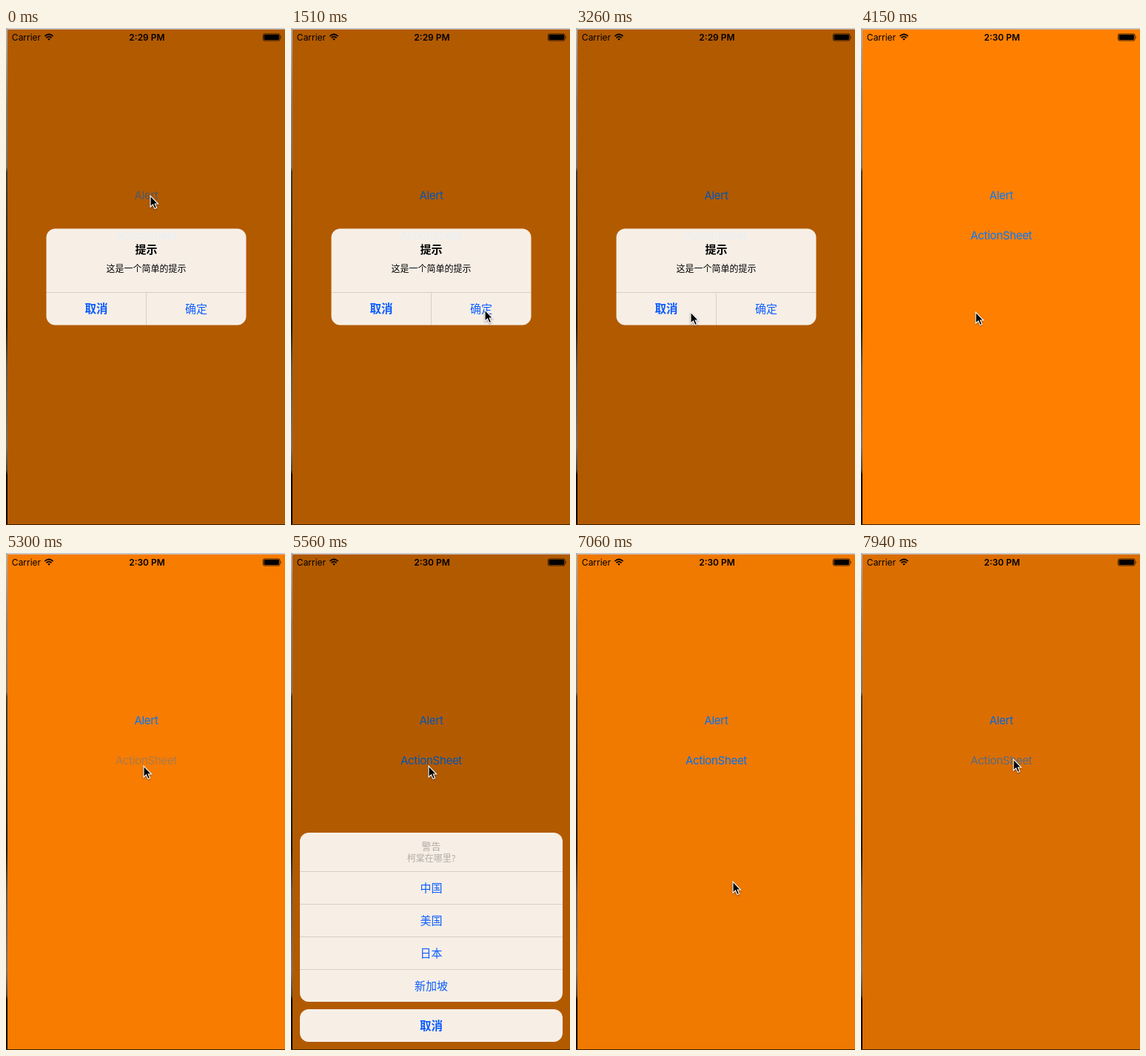
An HTML page that plays this animation: 377x670 px, repeating every 8000 ms.

```html
<!DOCTYPE html>
<html lang="zh-CN">
<head>
<meta charset="utf-8">
<style>
html, body { margin: 0; width: 100%; height: 100%; overflow: hidden; background: #111; }
svg { display: block; }
text { text-anchor: middle; font: 15px Inter, "Noto Sans CJK SC", "Noto Sans CJK", sans-serif; }
.link { fill: #007aff; letter-spacing: -.3px; }
.status text { font-size: 12px; font-weight: 500; }
.card { fill: #fff; fill-opacity: .9; }
.press { fill: #000; fill-opacity: .07; }
.line { stroke: #000; stroke-opacity: .13; }
.card-text text { font-family: "Noto Sans CJK SC", "Noto Sans CJK", sans-serif; }
.blue text { fill: #0a5cff; }
.gray text { fill: #b3aca5; }
.card-text .strong { font-weight: 700; }
.card-text .small { font-size: 12px; }
</style>
</head>
<body>
<svg width="377" height="670" viewBox="0 0 377 670">
  <defs>
    <linearGradient id="edge" x2="0" y2="1">
      <stop offset="0" stop-color="#b4b0ac"/>
      <stop offset=".15" stop-color="#85817d"/>
      <stop offset=".28" stop-color="#77736f"/>
      <stop offset=".29" stop-color="#3c3a38"/>
      <stop offset=".6" stop-color="#181818"/>
      <stop offset=".68" stop-color="#555"/>
      <stop offset=".84" stop-color="#77736f"/>
      <stop offset=".89" stop-color="#444"/>
      <stop offset=".9" stop-color="#000"/>
    </linearGradient>
    <clipPath id="screen"><path d="M2 2H377V669H2Z"/></clipPath>
    <clipPath id="alertShape"><rect x="54.5" y="270.5" width="270" height="130" rx="12"/></clipPath>
  </defs>
  <rect width="377" height="670" fill="#c9c6c3"/>
  <rect width="2" height="670" fill="url(#edge)"/>
  <rect y="669" width="377" height="1" fill="#3a2408"/>
  <g clip-path="url(#screen)">
    <rect width="377" height="670" fill="#ff8000"/>
    <text id="alertLink" class="link" x="189.5" y="230.5">Alert</text>
    <text id="sheetLink" class="link" x="189.5" y="284.5">ActionSheet</text>
    <rect id="dim" width="377" height="670"/>

    <g class="status">
      <text x="27.5" y="17" style="font-weight:400">Carrier</text>
      <text id="clock" x="190.5" y="17" style="font-weight:600"></text>
      <g fill="none" stroke="#000" stroke-width="1.7">
        <path d="M52.4 11.2Q58 5.8 63.6 11.2M54.5 13.3Q58 10 61.5 13.3"/>
        <path d="M56.3 14.9Q58 13.3 59.7 14.9L58 16.7Z" fill="#000" stroke="none"/>
      </g>
      <rect x="347.5" y="8" width="22.5" height="9" rx="1.8" fill="none" stroke="#000" stroke-width=".8"/>
      <rect x="348.6" y="9.1" width="20.3" height="6.8" rx=".8"/>
      <path d="M371 10.7q1.4 1.8 0 3.6z"/>
    </g>

    <g id="alert" class="card-text" clip-path="url(#alertShape)">
      <path class="card" d="M54 270H325V401H54Z"/>
      <path id="cancelPress" class="press" d="M54 356H189V401H54Z"/>
      <path id="okPress" class="press" d="M190 356H325V401H190Z"/>
      <path class="line" d="M54 356.5H325M189.5 357V401"/>
      <text class="strong" x="189.5" y="304">提示</text>
      <text class="small" x="189.5" y="329">这是一个简单的提示</text>
      <g class="blue">
        <text class="strong" x="122" y="384" style="font-size:15.5px">取消</text>
        <text x="257" y="384">确定</text>
      </g>
    </g>

    <g id="sheet" class="card-text">
      <rect class="card" x="12" y="377" width="355" height="228" rx="12"/>
      <rect class="card" x="12" y="615" width="355" height="44" rx="12"/>
      <path id="rowPress" class="press" d="M12 430H367V473H12Z"/>
      <path class="line" d="M12 429.5H367M12 473.5H367M12 517.5H367M12 561.5H367"/>
      <g class="gray">
        <text class="strong" x="189.5" y="399.5" style="font-size:13px;font-weight:500">警告</text>
        <text class="small" x="189.5" y="416">柯棠在哪里?</text>
      </g>
      <g class="blue">
        <text x="189.5" y="457">中国</text>
        <text x="189.5" y="501">美国</text>
        <text x="189.5" y="545">日本</text>
        <text x="189.5" y="589">新加坡</text>
        <text class="strong" x="189.5" y="642.5" style="font-size:15.5px">取消</text>
      </g>
    </g>
  </g>
  <path id="cursor" d="M0 0V15.2L3.5 12L6 17.6L8.6 16.5L6.2 11H10.6Z" stroke="#fff" stroke-width="1.1"
        style="filter:drop-shadow(0 1px 1px #0006)"/>
</svg>
<script>
const LOOP = 8000, STEP = 88.24;   // the screen refreshes in even steps
const el = id => document.getElementById(id);
const opacity = (id, v) => el(id).setAttribute('opacity', v);
const move = (id, x, y) => el(id).setAttribute('transform', `translate(${x} ${y})`);
const within = (n, a, b) => n >= a && n < b ? 1 : 0;

// Linear interpolation over a flat list: step, value, step, value, ...
function track(n, ...keys) {
  if (n <= keys[0]) return keys[1];
  for (let i = 2; i < keys.length; i += 2) {
    if (n <= keys[i]) {
      const k = (n - keys[i - 2]) / (keys[i] - keys[i - 2]);
      return keys[i - 1] + (keys[i + 1] - keys[i - 1]) * k;
    }
  }
  return keys[keys.length - 1];
}

// Cursor moves: first step, last step, x, y
const moves = [[4, 10, 262, 380], [19, 26, 182, 221], [32, 37, 155, 383],
  [48, 54, 186, 287], [68, 73, 212, 456], [78, 80, 212, 443], [80, 85, 206, 278]];

function cursorAt(n) {
  let x = 195, y = 226;
  for (const [from, to, tx, ty] of moves) {
    const k = Math.min(1, Math.max(0, (n - from) / (to - from)));
    const e = k * k * (3 - 2 * k);
    x += (tx - x) * e;
    y += (ty - y) * e;
  }
  return [x, y];
}

function draw(now) {
  const n = Math.floor((now % LOOP + 8) / STEP);
  opacity('dim', track(n, 17, .3, 18, .13, 19, 0, 29, 0, 30, .02, 31, .11, 32, .2, 33, .27, 34, .3,
    45, .3, 46, .13, 47, 0, 59, 0, 60, .03, 61, .143, 62, .25, 63, .3,
    77, .3, 78, .28, 79, .17, 80, .06, 81, 0, 88, 0, 89, .03, 90, .143));
  opacity('alert', track(n, 17, 1, 18, .4, 19, 0, 29, 0, 30, 1, 45, 1, 46, .4, 47, 0));
  opacity('alertLink', track(n, 0, .55, 2, 1, 27, 1, 28, .2, 30, .28, 33, .55, 35, 1));
  opacity('sheetLink', track(n, 56, 1, 57, .2, 59, .2, 60, .3, 61, .6, 63, 1,
    86, 1, 87, .2, 88, .2, 89, .3, 90, .6));
  opacity('okPress', within(n, 14, 17));
  opacity('cancelPress', within(n, 43, 45));
  opacity('rowPress', within(n, 76, 78));
  move('sheet', 0, track(n, 61, 293, 62, 60, 63, 0, 77, 0, 78, 30, 79, 220, 80, 293));
  move('cursor', ...cursorAt(n));
  el('clock').textContent = n < 43 ? '2:29 PM' : '2:30 PM';
}

const start = performance.now();
function tick() {
  draw(performance.now() - start);
  requestAnimationFrame(tick);
}
tick();
</script>
</body>
</html>
```
